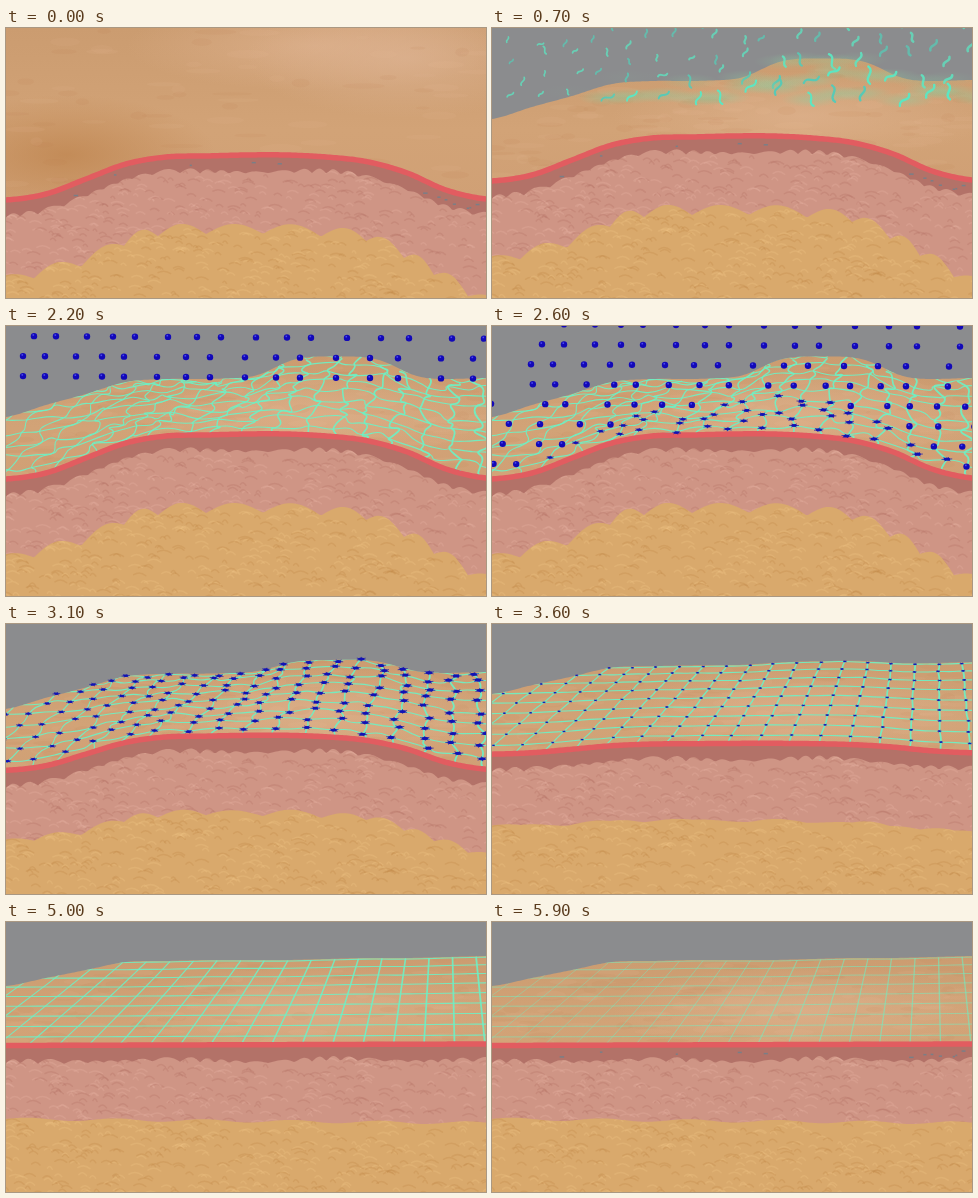
Recreate the animation shown at these times as an HTML page with a canvas. Size 480 by 270 pixels, loop 6 s.

```html
<!DOCTYPE html>
<html>
<head>
<meta charset="utf-8">
<style>
html, body { margin: 0; overflow: hidden; background: #8b8c8e; }
canvas { display: block; }
</style>
</head>
<body>
<canvas id="stage" width="480" height="270"></canvas>
<script>
const ctx = document.getElementById('stage').getContext('2d');
const LOOP = 6000, ROWS = 9, FIRST = -6, LAST = 16;
const MINT = '#6ef0c4';

// Heights sampled every 40 px across the stage
const HUMP_BACK = [91, 79, 68, 56, 53, 53, 52, 52, 52, 52, 52, 53, 52];
const FLAT_BACK = [64, 56, 48, 40, 39, 38, 38, 38, 37, 36, 36, 35, 34];
const HUMP_FRONT = [153, 147, 132, 117, 110, 109, 108, 108, 110, 114.5, 125.5, 143, 152];
const HUMP_FAT = [238, 228, 218, 198, 188, 187, 187, 187, 190, 194, 212, 235, 258];
const LOBES = [-22, 28, 75, 118, 152, 200, 257, 315, 360, 398, 428, 462, 500];
const BALL_X = [17, 39, 70, 96, 118, 151, 180, 204, 239, 270, 294, 330, 364, 392, 435, 467];

const clamp = v => Math.max(0, Math.min(1, v));
const lerp = (a, b, u) => a + (b - a) * u;
const ramp = (t, from, to) => clamp((t - from) / (to - from));
const smooth = u => u * u * (3 - 2 * u);
const noise = (a, b = 0) => {
  const n = Math.sin(a * 127.1 + b * 311.7 + 7.3) * 43758.5453;
  return n - Math.floor(n);
};

function curve(list, x) {
  const s = Math.max(0, Math.min(11.999, x / 40)), i = Math.floor(s), u = s - i;
  const [a, b, c, d] = [-1, 0, 1, 2].map(k => list[Math.max(0, Math.min(12, i + k))]);
  return b + u * (c - a + u * (2 * a - 5 * b + 4 * c - d + u * (3 * (b - c) + d - a))) / 2;
}

function lobe(x) {
  const i = LOBES.findIndex(v => v > x);
  return Math.sin(Math.PI * (x - LOBES[i - 1]) / (LOBES[i] - LOBES[i - 1]));
}

let time, flat, sunk, near; // clock, surface flattening, swelling loss, camera closeness

const swelling = x => 21.5 * Math.exp(-Math.pow((x - 330) / 66, 4));
const back = x => lerp(curve(HUMP_BACK, x), curve(FLAT_BACK, x), flat) - swelling(x) * (1 - sunk) - 120 * near;
const front = x => lerp(curve(HUMP_FRONT, x), 123.5 - x / 320, flat) + 19 * near;
const dermis = x => front(x) + 17.5 + Math.sin(x / 31) - (3.5 + 1.5 * Math.sin(x / 23)) * Math.abs(Math.sin(x / 6 + Math.sin(x / 17)));
const fat = x => lerp(curve(HUMP_FAT, x) - 10 * lobe(x), 197 + x / 120 - 1.5 * Math.sin(x / 14), sunk) + 19 * near;

function node(i, r) {
  const p = Math.pow((r + 0.2) / ROWS, 1.15);
  const shake = 1 - smooth(ramp(time, 2300, 3900));
  let x = 440 + (21.5 + 30.5 * i - 440) * (0.77 + 0.23 * p);
  const y = lerp(back(Math.max(x, 125)), front(x), p) + (noise(i, r * 2 + 50) - 0.5) * 9 * shake;
  x += (noise(i * 2, r * 3) - 0.5) * 17 * shake;
  return [x, y];
}

function trace(f, step = 2) {
  for (let x = 0; x <= 480; x += step) ctx.lineTo(x, f(x));
}

function layer(f, fill) {
  ctx.beginPath();
  trace(f);
  ctx.lineTo(480, 270);
  ctx.lineTo(0, 270);
  ctx.closePath();
  ctx.fillStyle = fill;
  ctx.fill();
}

function softSpot(x, y, w, h, color, alpha = 0.65) {
  ctx.save();
  ctx.translate(x, y);
  ctx.scale(w, h);
  const g = ctx.createRadialGradient(0, 0, 0, 0, 0, 1);
  g.addColorStop(0, `rgba(${color},${alpha})`);
  g.addColorStop(1, `rgba(${color},0)`);
  ctx.fillStyle = g;
  ctx.fillRect(-1, -1, 2, 2);
  ctx.restore();
}

// Short wavy marks that follow the top of a layer
function grain(top, seed, dark, light) {
  ctx.save();
  ctx.clip();
  ctx.lineWidth = 1.5;
  for (let k = 0; k < 620; k++) {
    const x = noise(k, seed) * 490 - 5, y = top(x) + noise(k, seed + 1) * 115;
    const w = 2 + noise(k, seed + 2) * 5;
    ctx.beginPath();
    ctx.moveTo(x - w, y + 1);
    ctx.quadraticCurveTo(x, y - 3, x + w, y + 2);
    ctx.strokeStyle = k % 2 ? dark : light;
    ctx.stroke();
  }
  ctx.restore();
}

function drawSkin() {
  const shift = 22 * near;
  const g = ctx.createLinearGradient(0, 30 - 30 * near, 0, 150 + shift);
  g.addColorStop(0, '#cb9c70');
  g.addColorStop(0.6, '#d2a377');
  g.addColorStop(1, '#d0a075');
  layer(back, g);
  ctx.save();
  ctx.clip();
  softSpot(60, 105 + shift, 150, 60, '190,132,78', 0.75 * near);
  softSpot(310, 88 - 70 * near, 190, 45, '224,180,145');
  if (near) softSpot(400, 30, 160, 60, '222,180,148', 0.65 * near);
  ctx.globalAlpha = 0.09;
  for (let k = 0; k < 90; k++) {
    const x = noise(k, 81) * 480, p = noise(k, 82);
    ctx.fillStyle = k % 2 ? '#b97f4e' : '#e6bd98';
    ctx.beginPath();
    ctx.ellipse(x, lerp(back(x), front(x), p), 6 + noise(k, 83) * 16, 1.5 + noise(k, 84) * 3, 0, 0, 7);
    ctx.fill();
  }
  ctx.restore();
}

const wormLanding = r => 700 + (node(8, r)[1] - 65 + 18 * (ROWS - 1 - r)) / 0.35;

function smoothLine(points) {
  ctx.beginPath();
  ctx.moveTo(...points[0]);
  for (let k = 1; k < points.length - 1; k++) {
    const [x, y] = points[k], [nx, ny] = points[k + 1];
    ctx.quadraticCurveTo(x, y, (x + nx) / 2, (y + ny) / 2);
  }
  ctx.lineTo(...points[points.length - 1]);
  ctx.stroke();
}

function drawNet() {
  if (time < 500) return;
  const fade = ramp(time, 4900, 6000);
  ctx.save();
  ctx.beginPath();
  trace(back);
  for (let x = 480; x >= 0; x -= 3) ctx.lineTo(x, front(x));
  ctx.clip();
  ctx.strokeStyle = MINT;
  const shown = r => ramp(time, wormLanding(r) - 40, wormLanding(r) + 80) * (0.92 - 0.4 * fade);
  for (let r = 0; r < ROWS; r++) {
    ctx.globalAlpha = shown(r);
    ctx.lineWidth = 1.1 - 0.2 * fade;
    const row = [];
    for (let i = FIRST; i <= LAST; i += 0.5) row.push(node(i, r));
    smoothLine(row);
  }
  const top = Array.from({ length: ROWS }, (_, r) => r).find(r => shown(r) > 0.3);
  if (top !== undefined) {
    ctx.globalAlpha = shown(top);
    for (let i = FIRST; i <= LAST; i++) {
      ctx.lineWidth = 1.1 + 0.05 * Math.max(0, i) - 0.5 * fade;
      const column = [];
      for (let r = top ? top : -0.5; r <= ROWS; r += 0.5) column.push(node(i, Math.max(0, r)));
      smoothLine(column);
    }
  }
  ctx.restore();
}

function worm(x, y, size, turn) {
  ctx.save();
  ctx.translate(x, y);
  ctx.rotate(turn);
  ctx.beginPath();
  ctx.moveTo(-size * 0.3, -size);
  ctx.bezierCurveTo(size * 0.7, -size * 0.5, -size * 0.7, size * 0.5, size * 0.3, size);
  ctx.stroke();
  ctx.restore();
}

function drawWorms() {
  if (time < 450 || time > 1250) return;
  ctx.lineCap = 'round';
  for (let r = 0; r < ROWS; r++) {
    for (let i = -3; i <= 16; i++) {
      const [tx, ty] = node(i, r);
      if (ty < back(tx) - 3) continue;
      const drop = 65 + 0.35 * (time - 700) - 18 * (ROWS - 1 - r) + (noise(i, r + 9) - 0.5) * 14;
      const y = Math.min(ty, drop);
      const x = lerp(i * 29 + 18 * noise(i, r), tx, clamp(drop / ty));
      const left = 1 - ramp(drop, ty + 5, ty + 40);
      const touching = ramp(y, back(x) - 6, back(x) + 6);
      softSpot(x, y, 30, 8, '140,205,160', 0.45 * touching * left);
      ctx.globalAlpha = left * (0.75 + 0.25 * touching);
      ctx.strokeStyle = noise(i, r) > 0.4 ? '#5ce6c2' : '#58c9b6';
      ctx.lineWidth = 1.6 + x / 500;
      worm(x, y, 2 + noise(r, i + 5) * 2 + x / 220 + touching * 3, noise(r, i) * 1.8 - 0.5 + time / 2000);
      ctx.globalAlpha = 1;
    }
  }
}

function drawTraces() {
  const count = time < 800 ? 12 : time < 1700 ? 85 : time > 5500 ? 12 : 0;
  ctx.fillStyle = 'rgba(85,135,155,.6)';
  for (let k = 0; k < count; k++) {
    const x = noise(k, 31) * 480;
    ctx.fillRect(x, front(x) + 5 + noise(k, 32) * 8, 1.5 + noise(k, 33) * 3, 1.5);
  }
  const ghost = 0.35 * ramp(time, 850, 1050) * (1 - ramp(time, 1100, 1500));
  if (!ghost) return;
  ctx.globalAlpha = ghost;
  ctx.strokeStyle = '#a0b994';
  ctx.lineWidth = 1.5;
  for (let k = 0; k < 12; k++) worm(85 + k * 30, 152 + noise(k, 41) * 12, 7, noise(k, 42) * 2 - 1);
  ctx.globalAlpha = 1;
}

function drawBall(x, y) {
  ctx.fillStyle = '#1208b8';
  ctx.beginPath();
  ctx.arc(x, y, 3.2, 0, 7);
  ctx.fill();
  ctx.fillStyle = '#4a48f0';
  ctx.fillRect(x - 1.5, y - 2, 1.6, 1.6);
}

function drawSplat(x, y, size, turn) {
  ctx.fillStyle = ctx.strokeStyle = '#1414b4';
  ctx.lineWidth = 0.7;
  ctx.beginPath();
  ctx.ellipse(x, y, size, size * 0.5, 0, 0, 7);
  ctx.fill();
  ctx.beginPath();
  for (let k = 0; k < 3; k++) {
    const a = k * 1.05 + turn, dx = Math.cos(a) * size * 1.5, dy = Math.sin(a) * size * 0.6;
    ctx.moveTo(x - dx, y - dy);
    ctx.lineTo(x + dx, y + dy);
  }
  ctx.stroke();
}

function drawBalls() {
  if (time < 1900 || time >= 3800) return;
  const left = 1 - ramp(time, 3200, 3800);
  for (let r = 0; r < ROWS; r++) {
    const order = ROWS - 1 - r;
    for (let i = -4; i < 16; i++) {
      const [tx, ty] = node(i, r);
      if (ty < back(tx) - 2) continue;
      const startX = i < 0 ? 28 * i : BALL_X[i] + 11 * (order >> 1);
      const drop = 50 + startX / 180 + 0.22 * (time - 2200) - 20 * order;
      if (drop < -5) continue;
      if (drop < ty) drawBall(lerp(startX, tx, smooth(ramp(drop, 54, Math.max(55, ty)))), drop);
      else drawSplat(tx, ty, (2.2 + Math.max(0, tx) / 400) * left, noise(i, r));
    }
  }
}

function draw(now) {
  time = Math.floor(now % LOOP / 100) * 100;
  flat = smooth(ramp(time, 2700, 4000));
  sunk = Math.pow(flat, 0.6);
  near = 1 - smooth(ramp(time, 0, 600));

  ctx.fillStyle = '#8b8c8e';
  ctx.fillRect(0, 0, 480, 270);
  drawSkin();
  drawNet();
  layer(front, '#b37268');
  layer(dermis, '#cf9585');
  grain(front, 11, 'rgba(178,112,100,.3)', 'rgba(228,174,158,.32)');
  drawTraces();
  layer(fat, '#d9a96c');
  grain(fat, 21, 'rgba(190,132,70,.28)', 'rgba(236,194,132,.32)');
  ctx.beginPath();
  trace(front);
  ctx.strokeStyle = '#e25c60';
  ctx.lineWidth = 5.5;
  ctx.stroke();
  drawWorms();
  drawBalls();
  requestAnimationFrame(draw);
}

requestAnimationFrame(() => draw(performance.now()));
</script>
</body>
</html>
```
